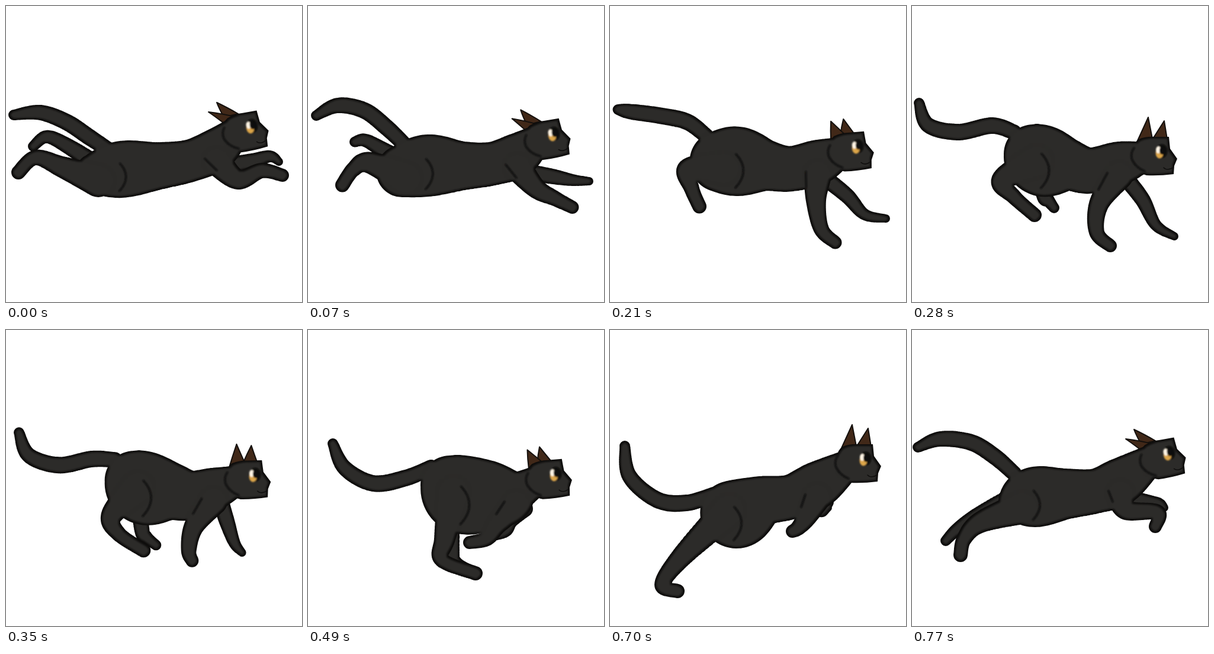
Recreate the animation shown at these times as an HTML page. Size 500 by 500 pixels, loop 0.84 s.

```html
<!DOCTYPE html>
<html lang="en">
<head>
<meta charset="utf-8">
<title>Running cat</title>
<style>
  html, body { margin: 0; width: 100%; height: 100%; overflow: hidden; background: #fff; }
  svg { display: block; width: 100vw; height: 100vh; }
  .fur { fill: #2c2b29; }
  .ear { fill: #412818; stroke: #14100d; stroke-width: 2; stroke-linejoin: round; }
  .line { fill: none; stroke: #100f0e; stroke-width: 3; stroke-linecap: round; stroke-linejoin: round; }
</style>
</head>
<body>
<svg viewBox="0 0 500 500">
  <defs>
    <filter id="rim" filterUnits="userSpaceOnUse" x="0" y="0" width="500" height="500" color-interpolation-filters="sRGB">
      <feMorphology operator="erode" radius="3"/>
      <feGaussianBlur stdDeviation="1.5" result="inner"/>
      <feFlood flood-color="#0d0c0b"/>
      <feComposite operator="in" in2="SourceAlpha" result="edge"/>
      <feComposite in="inner" in2="edge" operator="atop"/>
    </filter>
    <filter id="soft" x="-30%" y="-30%" width="160%" height="160%"><feGaussianBlur stdDeviation=".8"/></filter>
  </defs>
  <g class="fur" filter="url(#rim)"><path id="farHind"/><path id="farFore"/></g>
  <g class="ear"><path id="farEar"/><path id="nearEar"/></g>
  <g class="fur" filter="url(#rim)">
    <path id="tail"/><path id="body"/><path id="hind"/><path id="fore"/>
    <path class="head" d="M-45-4Q-43-16-35-21Q-22-26-8-25L16-25Q17-14 18-5L30 12L25 24L24 38Q0 41-22 40Q-40 35-45 20Z"/>
  </g>
  <g class="line" filter="url(#soft)"><path id="haunch"/><path id="shoulder"/></g>
  <g class="head">
    <path class="line" filter="url(#soft)" d="M-43-6Q-50 4-46 14Q-40 27-25 33"/>
    <path class="line" style="stroke-width:1.6" d="M7 27Q13 33 23 27"/>
    <g filter="url(#soft)">
      <ellipse cx="4" cy="-1" rx="9.5" ry="11.5" fill="#090807"/>
      <ellipse cx="0" cy="2" rx="6.5" ry="9.5" fill="#dca54a"/>
      <ellipse cx="-2" cy="-3" rx="4" ry="6" fill="#fff6e6"/>
      <ellipse cx="4.5" cy="-2" rx="4.5" ry="7" fill="#090807"/>
    </g>
  </g>
</svg>
<script>
const STEP = 70, STEPS = 12;

// Thickness along each limb, the same in every pose.
const RADII = {
  tail: [9, 13, 14, 14, 13],
  hind: [28, 18, 13, 12], farHind: [16, 13, 11, 9],
  fore: [24, 17, 13, 11], farFore: [14, 13, 10, 7]
};
// Where each leg joins the body: spine index and offset.
const ROOTS = { hind: [0, 6, 12], farHind: [0, 4, -14], fore: [4, 0, 20], farFore: [4, 14, 28] };
// Ear triangles around the eye, upright and laid back.
const EARS = {
  nearEar: [[-40, -12, -19, -58, -12, -22], [-44, -6, -70, -25, -22, -16]],
  farEar: [[-11, -22, 8, -52, 13, -21], [-44, -16, -56, -41, -20, -22]]
};

// Key poses: spine as x, y, radius from hip to shoulder; joints as x, y.
const poses = [
  { at: 0, eye: [412,204], fold: [1],
    spine: [150,283,34, 195,276,48, 258,270,40, 312,261,36, 356,242,36],
    tail: [13,184, 58,180, 102,196, 140,221, 175,244],
    hind: [95,272, 50,256, 21,281], farHind: [100,234, 68,221, 46,237],
    fore: [392,293, 432,278, 467,286], farFore: [415,262, 446,254, 461,263] },
  { at: 2, eye: [412,230], fold: [0.9],
    spine: [168,275,54, 210,263,57, 260,270,43, 308,272,38, 352,262,39],
    tail: [15,186, 42,156, 88,157, 125,189, 152,225],
    hind: [111,257, 104,295, 95,324], farHind: [138,243, 122,232, 112,222],
    fore: [380,324, 402,372, 426,394], farFore: [412,314, 448,334, 489,329] },
  { at: 4, eye: [418,246], fold: [0],
    spine: [205,250,50, 222,262,60, 262,268,44, 300,278,39, 350,266,37],
    tail: [12,164, 27,201, 78,213, 135,202, 172,213],
    hind: [152,294, 172,322, 207,353], farHind: [222,317, 230,328, 240,341],
    fore: [316,334, 312,382, 335,405], farFore: [390,328, 412,370, 443,389] },
  { at: 7, eye: [415,244], fold: [0.5],
    spine: [240,262,50, 262,278,66, 300,280,60, 332,282,48, 352,274,34],
    tail: [42,192, 62,233, 110,259, 165,250, 208,232],
    hind: [231,352, 226,388, 283,411], farHind: [243,368, 250,393, 280,408],
    fore: [320,328, 302,352, 273,359], farFore: [342,322, 334,340, 310,350] },
  { at: 8, eye: [428,218], fold: [0],
    spine: [184,308,26, 215,300,48, 260,284,54, 305,275,47, 342,266,40],
    tail: [13,209, 48,262, 90,308, 130,307, 165,300],
    hind: [178,368, 190,408, 229,422], farHind: [219,368, 228,400, 250,418],
    fore: [318,336, 302,370, 273,379], farFore: [347,345, 336,375, 319,391] },
  { at: 10, eye: [428,218], fold: [0],
    spine: [195,292,34, 213,311,58, 255,290,43, 305,282,38, 350,262,40],
    tail: [25,196, 33,247, 80,287, 130,292, 175,278],
    hind: [122,382, 88,430, 114,441], farHind: [140,365, 105,400, 95,428],
    fore: [332,316, 318,334, 308,340], farFore: [357,303, 363,301, 368,300] },
  { at: 11, eye: [431,209], fold: [1],
    spine: [180,288,34, 208,282,51, 258,277,43, 310,272,38, 352,256,40],
    tail: [10,198, 48,184, 100,190, 140,214, 172,242],
    hind: [115,325, 88,353, 82,380], farHind: [112,312, 76,337, 57,356],
    fore: [362,304, 415,308, 411,332], farFore: [402,292, 418,294, 426,300] }
];

const el = id => document.getElementById(id);
const lerp = (a, b, t) => a.map((v, i) => v + (b[i] - v) * t);
const add = (p, x, y) => [p[0] + x, p[1] + y];
const group = (list, n) => Array.from({ length: list.length / n }, (_, i) => list.slice(i * n, i * n + n));

// Overlapping discs along a Catmull-Rom line of [x, y, radius] points.
function limb(p) {
  const last = p.length - 1, SUB = 16;
  let d = '';
  for (let s = 0; s <= last * SUB; s++) {
    const i = Math.min(last - 1, Math.floor(s / SUB)), t = s / SUB - i;
    const [a, b, c, e] = [p[Math.max(0, i - 1)], p[i], p[i + 1], p[Math.min(last, i + 2)]];
    const [x, y, r] = b.map((v, j) => v + t / 2 * (c[j] - a[j]
      + t * (2 * a[j] - 5 * v + 4 * c[j] - e[j] + t * (3 * (v - c[j]) + e[j] - a[j]))));
    d += `M${x - r} ${y}a${r} ${r} 0 0 1 ${2 * r} 0a${r} ${r} 0 0 1 ${-2 * r} 0`;
  }
  return d;
}

function poseAt(step) {
  const next = poses.findIndex(p => p.at >= step), b = poses[next];
  if (b.at === step) return b;
  const a = poses[next - 1], t = (step - a.at) / (b.at - a.at), mix = {};
  for (const key in a) if (key !== 'at') mix[key] = lerp(a[key], b[key], t);
  return mix;
}

function build(step) {
  const p = poseAt(step), spine = group(p.spine, 3), [fold] = p.fold, d = {};
  const root = {};
  for (const key in RADII) {
    const joints = group(p[key], 2);
    if (ROOTS[key]) {
      const [i, x, y] = ROOTS[key];
      joints.unshift(root[key] = add(spine[i], x, y));
    }
    d[key] = limb(joints.map((j, i) => [...j, RADII[key][i]]));
  }
  d.body = limb([...spine, [...add(p.eye, -25, 8), 24]]);

  for (const key in EARS) {
    const [a, tip, b] = group(lerp(...EARS[key], fold), 2).map(q => add(p.eye, ...q));
    const mid = q => add(lerp(q, tip, 0.5), -2 * fold, -2 * fold);
    d[key] = `M${a}Q${mid(a)} ${tip}Q${mid(b)} ${b}Z`;
  }

  const [hx, hy, hr] = spine[1], k = hr / 58;
  const arc = (x, y) => [hx + x * k, hy + y * k];
  d.haunch = `M${arc(-3, -12)}C${arc(12, 4)} ${arc(15, 24)} ${arc(-4, 44)}`;
  const bend = lerp(root.fore, p.fore, 0.5);
  d.shoulder = `M${add(root.fore, -20, -4)}L${add(bend, -18, 0)}`;
  return { d, head: `translate(${p.eye}) rotate(${-10 * fold})` };
}

const steps = Array.from({ length: STEPS }, (_, i) => build(i));
let shown = -1;

function show(step) {
  if (step === shown) return;
  shown = step;
  const { d, head } = steps[step];
  for (const id in d) el(id).setAttribute('d', d[id]);
  for (const part of document.querySelectorAll('.head')) part.setAttribute('transform', head);
}

const start = performance.now();
function tick() {
  show(Math.floor((performance.now() - start) / STEP) % STEPS);
  requestAnimationFrame(tick);
}
tick();
</script>
</body>
</html>
```
